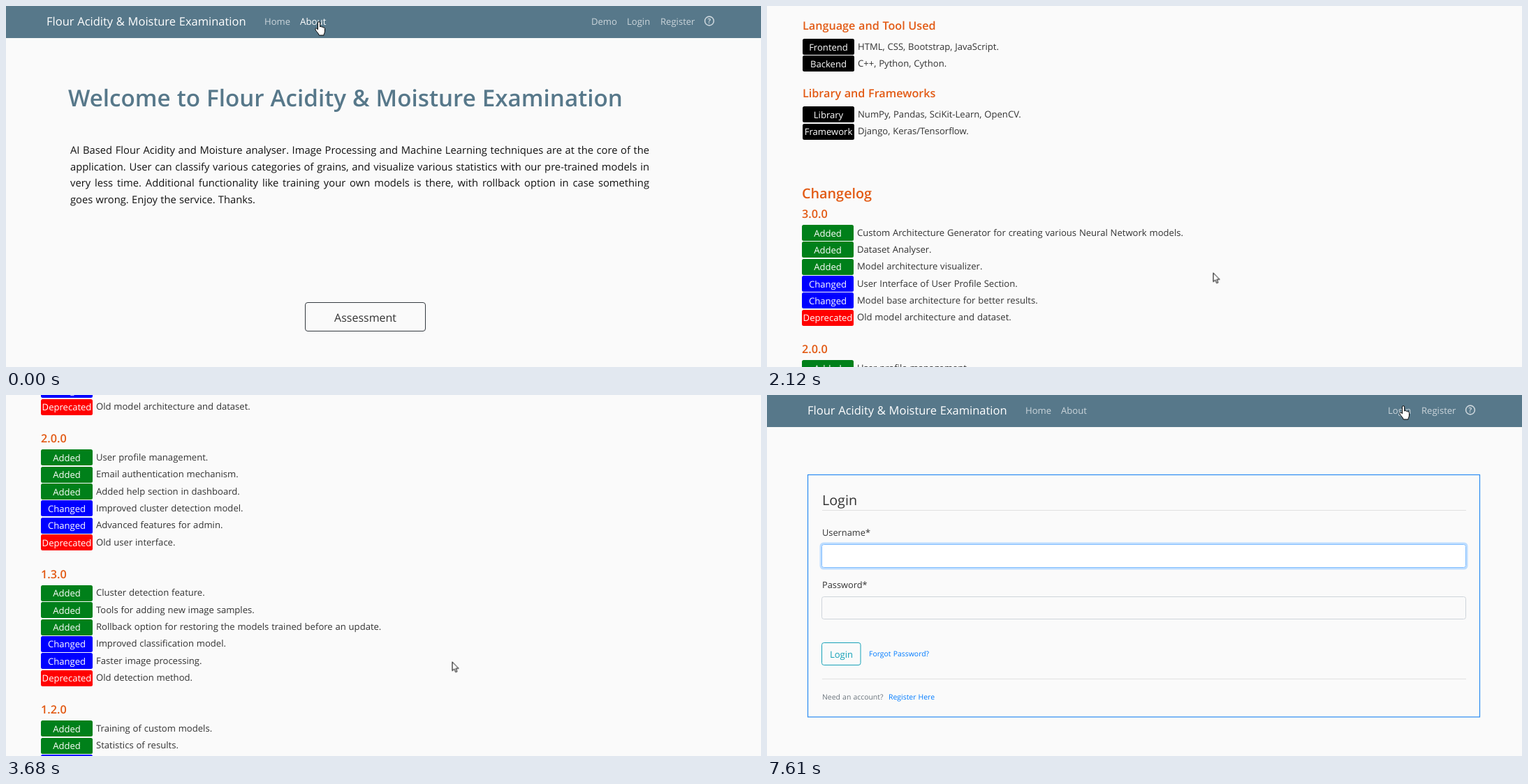
An HTML page that plays this animation: 1081 by 518 pixels, repeating every 8000 ms.

```html
<!DOCTYPE html>
<html lang="en">
<head>
<meta charset="utf-8">
<title>Flour Acidity &amp; Moisture Examination</title>
<style>
  html, body { margin: 0; width: 100%; height: 100%; overflow: hidden; background: #fafafa; }
  svg {
    display: block; width: 1081px; height: 518px;
    font-family: "Open Sans", "Noto Sans", sans-serif; font-size: 13.08px; word-spacing: .4px;
    fill: #333; text-rendering: geometricPrecision;
  }
  text { white-space: pre; }
  .bar { fill: #57788a; }
  .brand { font-size: 16.5px; fill: #fff; }
  .nav { fill: #cbd5db; }
  .h { font-weight: 600; }
  .h1 { font-size: 33.2px; fill: #57788a; }
  .h2 { font-size: 25.8px; fill: #444; }
  .h3 { font-size: 22.3px; fill: #e25a14; }
  .h4 { font-size: 19.8px; fill: #e25a14; }
  .h5 { font-size: 16.2px; fill: #e25a14; }
  .mid { text-anchor: middle; }
  .tag { fill: #fff; text-anchor: middle; }
  .link { fill: #007bff; }
  .small { font-size: 10.45px; }
  .active { font-size: 13.3px; fill: #fff; }
  .button { font-size: 16px; text-anchor: middle; }
  .legend { font-size: 19.7px; }
  .label { font-size: 12.8px; }
  .teal { fill: #17a2b8; }
  .muted { fill: #6c757d; }
  .line { stroke: #e1e1e1; }
  .intro { font-size: 14.75px; line-height: 23.5px; color: #111; }
  .intro div { white-space: nowrap; text-align: justify; text-align-last: justify; }
  .intro div:last-child { text-align-last: left; }

  .home, .about, .login, .page, .hover, .hand, .arrow, .glow, .caret {
    animation: 8s step-end infinite;
  }
  .home { animation-name: home; }
  .about { animation-name: about; }
  .login { animation-name: login; }
  .page { animation-name: scroll; }
  .hover { animation-name: hover; }
  .hand { animation-name: hand; }
  .arrow { animation-name: arrow; }
  .glow { animation-name: glow; }
  .caret { animation-name: caret; }

  @keyframes home { 0% { opacity: 1 } 5%, 100% { opacity: 0 } }
  @keyframes about { 0% { opacity: 0 } 5% { opacity: 1 } 88.875%, 100% { opacity: 0 } }
  @keyframes login { 0% { opacity: 0 } 88.875%, 100% { opacity: 1 } }
  @keyframes scroll {
    0% { transform: translateY(0) }
    17.25% { transform: translateY(-2.5px) }
    18.75% { transform: translateY(-24px) }
    20.25% { transform: translateY(-62px) }
    21.75% { transform: translateY(-104px) }
    23.25% { transform: translateY(-146px) }
    24.75% { transform: translateY(-184px) }
    26.5% { transform: translateY(-204px) }
    31.5% { transform: translateY(-210px) }
    33% { transform: translateY(-245px) }
    34.5% { transform: translateY(-302px) }
    36% { transform: translateY(-360px) }
    37.5% { transform: translateY(-405px) }
    39.375% { transform: translateY(-419px) }
    44.125% { transform: translateY(-546px) }
    46% { transform: translateY(-634px) }
    58.875% { transform: translateY(-334px) }
    60.375%, 100% { transform: translateY(0) }
  }
  @keyframes hover { 0% { fill: #cbd5db } 75.625%, 100% { fill: #fff } }
  @keyframes hand {
    0% { opacity: 1; transform: translate(442px, 22px) }
    9.625% { opacity: 0; transform: translate(905px, 15px) }
    75.625%, 100% { opacity: 1; transform: translate(905px, 15px) }
  }
  @keyframes arrow {
    0% { opacity: 0; transform: translate(447px, 23px) }
    9.625% { opacity: 1; transform: translate(505px, 130px) }
    11.125% { opacity: 1; transform: translate(602px, 318px) }
    12.625% { opacity: 1; transform: translate(638.5px, 382.5px) }
    68.125% { opacity: 1; transform: translate(652px, 362px) }
    69.625% { opacity: 1; transform: translate(704px, 290px) }
    71.125% { opacity: 1; transform: translate(785px, 185px) }
    72.625% { opacity: 1; transform: translate(860px, 90px) }
    74.125% { opacity: 1; transform: translate(900px, 36px) }
    75.625%, 100% { opacity: 0; transform: translate(910px, 16px) }
  }
  @keyframes glow { 0% { opacity: .5 } 90.375%, 100% { opacity: 1 } }
  @keyframes caret { 0% { opacity: 1 } 95.125%, 100% { opacity: 0 } }
</style>
</head>
<body>
<svg id="stage" viewBox="0 0 1081 518"></svg>
<script>
const brand = 'Flour Acidity &amp; Moisture Examination';
const tagColor = { Added: '#00801a', Changed: '#00f', Deprecated: '#f00' };

const text = (x, y, str, cls = '') => `<text x="${x}" y="${y}" class="${cls}">${str}</text>`;
const box = (x, y, w, h, attrs) => `<rect x="${x}" y="${y}" width="${w}" height="${h}" ${attrs}/>`;
const rule = y => `<path class="line" d="M79 ${y}H1001"/>`;

// Navigation bar; dx shifts its content, links is a list of [x, label, class]
const navbar = (dx, links) =>
  box(0, 0, 1081, 46, 'class="bar"') +
  `<g transform="translate(${dx})">` +
  text(58, 28.3, brand, 'brand') +
  links.map(([x, label, cls = 'nav']) => text(x, 26.8, label, cls)).join('') +
  '<circle cx="1007" cy="21.5" r="6.4" fill="none" stroke="#cbd5db" stroke-width="1.6"/>' +
  '<text x="1007" y="25.2" class="nav mid" font-size="10" font-weight="700">?</text></g>';

// A coloured tag with its description
const row = (x, y, tag, desc, color = '#000') =>
  box(x, Math.round(y), 74, 23, `rx="2.5" fill="${color}"`) +
  text(x + 37, y + 16.5, tag, 'tag') +
  text(x + 79, y + 15.5, desc);

const release = ([version, ...items], i) => {
  const top = 518 + i * 194.4;
  return text(50, top - 10.3, version, 'h h5') + items.map((item, n) => {
    const [tag, desc] = item.split('|');
    return row(50, top + n * 24.35, tag, desc, tagColor[tag]);
  }).join('');
};

const releases = [
  ['3.0.0',
    'Added|Custom Architecture Generator for creating various Neural Network models.',
    'Added|Dataset Analyser.',
    'Added|Model architecture visualizer.',
    'Changed|User Interface of User Profile Section.',
    'Changed|Model base architecture for better results.',
    'Deprecated|Old model architecture and dataset.'],
  ['2.0.0',
    'Added|User profile management.',
    'Added|Email authentication mechanism.',
    'Added|Added help section in dashboard.',
    'Changed|Improved cluster detection model.',
    'Changed|Advanced features for admin.',
    'Deprecated|Old user interface.'],
  ['1.3.0',
    'Added|Cluster detection feature.',
    'Added|Tools for adding new image samples.',
    'Added|Rollback option for restoring the models trained before an update.',
    'Changed|Improved classification model.',
    'Changed|Faster image processing.',
    'Deprecated|Old detection method.'],
  ['1.2.0',
    'Added|Training of custom models.',
    'Added|Statistics of results.',
    'Changed|Image upload section.']
];

const intro = [
  'AI Based Flour Acidity and Moisture analyser. Image Processing and Machine Learning techniques are at the core of the',
  'application. User can classify various categories of grains, and visualize various statistics with our pre-trained models in',
  'very less time. Additional functionality like training your own models is there, with rollback option in case something',
  'goes wrong. Enjoy the service. Thanks.'
];

const home = navbar(0, [[370, 'Home'], [421, 'About', 'active'],
    [838, 'Demo'], [889, 'Login'], [937, 'Register']]) +
  text(89, 144, 'Welcome to ' + brand, 'h h1') +
  `<foreignObject x="92" y="196.3" width="829" height="100"><div class="intro">${
    intro.map(line => `<div>${line}</div>`).join('')}</div></foreignObject>` +
  box(428.5, 425.5, 172, 41, 'rx="3.5" fill="none" stroke="#343a40"') +
  text(514.5, 453, 'Assessment', 'button');

const link = name => `<tspan class="link">${name}</tspan>`;
const about = navbar(-7.5, [[370, 'Home'], [421, 'About'],
    [889, 'Login', 'hover'], [937, 'Register']]) +
  text(51, 81, 'About', 'h h1') +
  text(51, 129, brand.replace('&amp;', 'and'), 'h h2') +
  text(51, 165.5, 'Version 3.0.0', 'h h3') +
  text(51, 196.3, `This application is developed by ${link('Jiv Nav Dholi')} and ${
    link('Tarunesh Vimal Koti')} under the guidance of ${link('Prof. Harivesh Tandolkar')}.`) +
  text(51, 237.6, 'Language and Tool Used', 'h h5') +
  row(51, 251, 'Frontend', 'HTML, CSS, Bootstrap, JavaScript.') +
  row(51, 275.3, 'Backend', 'C++, Python, Cython.') +
  text(51, 334.8, 'Library and Frameworks', 'h h5') +
  row(51, 348.2, 'Library', 'NumPy, Pandas, SciKit-Learn, OpenCV.') +
  row(51, 372.5, 'Framework', 'Django, Keras/Tensorflow.') +
  text(50, 480, 'Changelog', 'h h4') +
  releases.map(release).join('');

const login = navbar(0, [[370, 'Home'], [421, 'About'], [889, 'Login'], [937, 'Register']]) +
  box(58.5, 114.5, 962, 347.5, 'fill="none" stroke="#2a8bf2" stroke-width="1.2"') +
  text(79, 158, 'Login', 'legend') + rule(165.5) +
  text(79, 202.3, 'Username*', 'label') +
  box(77, 213, 925, 36, 'class="glow" rx="4" fill="none" stroke="#bfdeff" stroke-width="3"') +
  box(78.5, 214.5, 922, 33, 'rx="3" fill="#fff" stroke="#80bdff"') +
  box(89, 221, 1, 19, 'class="caret" fill="#333"') +
  text(79, 276.8, 'Password*', 'label') +
  box(78.5, 289.5, 922, 32, 'rx="3" fill="#fafafa" stroke="#ced4da"') +
  box(78.5, 355.5, 55.5, 32, 'rx="3" fill="none" stroke="#17a2b8"') +
  text(106.5, 376.8, 'Login', 'mid teal') +
  text(146, 375, 'Forgot Password?', 'link small') + rule(407.5) +
  text(79, 437.3, 'Need an account?', 'small muted') +
  text(174, 437.3, 'Register Here', 'link small');

const cursors = `<g fill="#fff" stroke="#000" stroke-linejoin="round">
  <path class="arrow" d="M.5 .5V13.2L3.4 10.6 5.3 15.2 7.4 14.3 5.5 9.9H9.6Z"/>
  <path class="hand" d="M4.5 11.8V2.2a1.6 1.6 0 0 1 3.2 0V8a1.5 1.5 0 0 1 2.6 .4
    a1.4 1.4 0 0 1 2.3 .8a1.2 1.2 0 0 1 1.9 1V14c0 3-1.5 3.5-1.5 6H6.3
    C6 17.5 1.5 14 1 11.7c-.4-1.6 1.4-2.2 2.3-1Z"/></g>`;

document.getElementById('stage').innerHTML =
  `<g class="home">${home}</g><g class="about"><g class="page">${about}</g></g>` +
  `<g class="login">${login}</g>${cursors}`;
</script>
</body>
</html>
```
